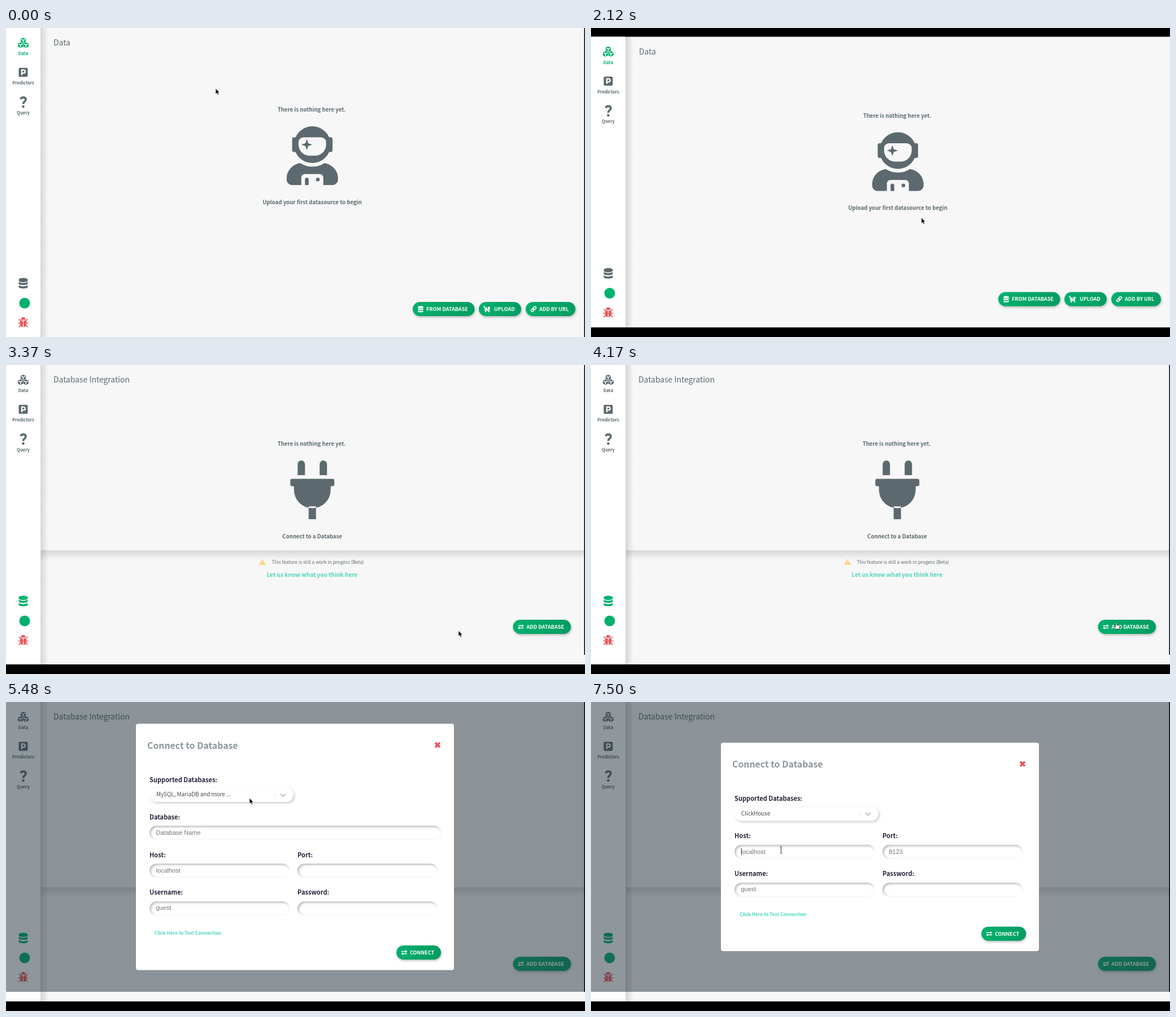
Recreate the animation shown at these times as an HTML page. Size 1025 by 547 pixels, loop 8 s.

```html
<!DOCTYPE html>
<html lang="en">
<head>
<meta charset="utf-8">
<title>Connect to a database</title>
<style>
html, body { margin: 0; width: 100%; height: 100%; overflow: hidden; background: #000 }
svg { display: block }
text { font-family: "Noto Sans CJK JP", "Noto Sans CJK SC", "Open Sans", sans-serif; fill: #5c696f; white-space: pre }
.b { font-weight: 700 }
.m { text-anchor: middle }
.in { font-family: "Liberation Sans", Arial, sans-serif; font-size: 10.95px; fill: #757575 }
.icon { fill: #5c696f; color: #5c696f }
.on, .on text { fill: #00b06d; color: #00b06d }
.btn text { fill: #fff }
.btn > rect { fill: url(#green); filter: drop-shadow(1px 2px 2px #0004) }
.line { fill: none; stroke: #fff; stroke-width: 1.5 }
.field, .select { box-sizing: border-box; height: 25px; margin: 3px; border-radius: 13px; background: #fff }
.field { box-shadow: inset 2px 2px 4px #b4b4b4, inset -2px -2px 4px #fff }
.select { box-shadow: 2px 2px 4px #ccc }
#menu { filter: drop-shadow(1px 2px 3px #0005) }
#menu text { fill: #9ba1a4 }
</style>
</head>
<body>
<svg id="stage" width="1025" height="547" viewBox="0 0 1025 547"></svg>
<script>
const text = (x, y, s, size, cls = "", extra = "") =>
  `<text x="${x}" y="${y}" font-size="${size}" class="${cls}" ${extra}>${s}</text>`;
const rect = (x, y, w, h, fill, rx = 0) =>
  `<rect x="${x}" y="${y}" width="${w}" height="${h}" rx="${rx}" fill="${fill}"/>`;
const group = (id, body, cls = "", at = "0 0") =>
  `<g id="${id}" class="${cls}" transform="translate(${at})">${body}</g>`;
const at = (x, y, body, k = 1) => `<g transform="translate(${x} ${y}) scale(${k})">${body}</g>`;
const box = (x, y, w, cls) =>
  `<foreignObject x="${x - 3}" y="${y - 3}" width="${w + 10}" height="34"><div class="${cls}" style="width:${w}px"></div></foreignObject>`;

// Icons, centred on 0,0
const cube = (x, y) => at(x, y,
  `<path d="M0-5l4.6 2v5.4L0 4.8l-4.6-2.4V-3z"/><path d="M-3.4-2L0-.5 3.4-2M0-.5V3.6" class="line" stroke-width="1.2"/>`);
const cubes = cube(0, -4.3) + cube(-4.8, 4) + cube(4.8, 4);
const disks = `<path d="M-8-6c0-4 16-4 16 0v1.500c0 4-16 4-16 0z"/>` +
  [-2, 4].map(y => `<path d="M-8 ${y}q8 4 16 0v3c0 3.500-16 3.500-16 0z"/>`).join("");
const parking = rect(-8, -8, 16, 16, "currentColor", 2) +
  `<path d="M-2.500 5V-4.200H.6a2.800 2.800 0 0 1 0 5.600H-2.500" class="line" style="stroke-width:2.2"/>`;
const question = `<path d="M-4.500-5C-3-9.500 4.500-9 4.500-4.500 4.500-.8 0-1 0 3.500" fill="none" stroke="currentColor" stroke-width="3.600"/><circle cy="8" r="2.300"/>`;
const bug = `<path d="M-4.500-4.600a4.500 4.500 0 0 1 9 0zM-5.500-3.300H-.7V8.500Q-5.500 8-5.500 3zM5.500-3.300H.7V8.500Q5.500 8 5.500 3z"/>
  <path d="M-8-6l3 3M8-6L5-3M-9 1.500H9M-8 8.500l3.500-4M8 8.500l-3.500-4" fill="none" stroke="#e8575c" stroke-width="1.700"/>`;
const cart = `<path d="M-6-4.500h2L-2.500 2.500H5" class="line"/><path d="M-2.500-3h3v3h1.500v-4H6L5 1.500h-7z" fill="#fff"/>
  <g fill="#fff"><circle cx="-2" cy="4.500" r="1.300"/><circle cx="4" cy="4.500" r="1.300"/></g>`;
const link = `<g class="line" transform="rotate(-45)"><rect x="-5.500" y="-2" width="6.500" height="4" rx="2"/><rect x="-1" y="-2" width="6.500" height="4" rx="2"/></g>`;
const swap = `<path d="M-5-2H3M5 2H-3" class="line"/><path d="M2-4.500L5.500-2 2 .5zM-2-.5L-5.500 2-2 4.500z" fill="#fff"/>`;

const astronaut = `<circle cx="224" cy="160" r="160"/>${rect(48, 96, 352, 128, "currentColor", 16)}
  <path fill="#f7f7f7" d="M104 136c0-22 21-40 48-40h144c27 0 48 18 48 40v24c0 53-43 96-96 96h-48c-53 0-96-43-96-96z"/>
  <path d="M176 112l12 36 36 12-36 12-12 36-12-36-36-12 36-12z"/>
  <path d="M120 321C53 328 0 385 0 454v10c0 26 21 48 48 48h80v-64c0-18 14-32 32-32h128c18 0 32 14 32 32v64h80c27 0 48-22 48-48v-10c0-69-53-126-120-133-30 20-66 31-104 31s-74-11-104-31z"/>
  <circle cx="272" cy="464" r="16"/><path d="M160 512v-48a16 16 0 0 1 32 0v48z"/>`;
const plug = `<path d="M64 128V32a32 32 0 0 1 64 0v96zM256 128V32a32 32 0 0 1 64 0v96zM32 220v36a160 160 0 0 0 320 0v-36zM160 400h64v112h-64z"/>
  ${rect(0, 160, 384, 64, "currentColor", 16)}`;

const button = (x, y, w, icon, label, id = "") =>
  group(id, rect(0, 0, w, 25, "", 12.5) + at(14, 12.5, icon) + text(24, 15.900, label, 9.05, "b"), "btn", `${x} ${y}`);
const nav = (id, y, icon, label) =>
  group(id, at(30.5, y, icon) + text(30.5, y + 21.700, label, 7.6, "b m"), "icon");
const label = (x, y, s) => text(x, y + 4, s, 11.05, "b", 'style="fill:#25243c"');
const field = (x, y, w, s, id = "") => box(x, y - 12, w, "field") + text(x + 11.5, y + 3.900, s, 10.95, "in", `id="${id}"`);
const pick = (id, s) => text(266, 167.400, s, 9.85, "", `id="${id}" style="fill:#45484f"`);
const empty = text(541, 148, "There is nothing here yet.", 9.67, "b m");

const engines = ["ClickHouse", "MariaDB", "MongoDB", "Quillmont SQL Server", "MySQL", "PostgreSQL", "Brindlark"];

const sidebar = rect(0, 0, 61, 547, "#fff") + rect(61, 0, 14, 547, "url(#side)") +
  nav("navData", 26.5, cubes, "Data") + nav("navPred", 78.5, parking, "Predictors") + nav("navQuery", 131, question, "Query");
const tools = group("tools", group("navDb", at(30.5, -95.5, disks), "icon") +
  `<circle cx="33" cy="-60" r="9.500" fill="#00b06d"/><g fill="#e8575c">${at(30.5, -26, bug)}</g>`);

const dataPage = group("dataPage", text(84, 31, "Data", 13.9) +
  group("dataMid", empty + `<g class="icon">${at(496.8, 174, astronaut, .203)}</g>` +
    text(542, 311.600, "Upload your first datasource to begin", 9.67, "b m")) +
  group("dataBtns", button(720, -62, 109.5, `<g fill="#fff">${at(0, 0, disks, .6)}</g>`, "FROM DATABASE", "fromDb") +
    button(837, -62, 75, cart, "UPLOAD").replace('x="24"', 'x="27"') + button(920, -62, 88, link, "ADD BY URL")));

const dbPage = group("dbPage", text(84, 31, "Database Integration", 13.9) + rect(62, 328, 970, 17, "url(#fall)") +
  group("", empty + `<g class="icon">${at(503.3, 174, plug, .203)}</g>` +
    text(542, 311.600, "Connect to a Database", 9.67, "b m"), "", "0 -5") +
  `<path d="M454 344.500l4.800 8.500h-9.600z" fill="#fad27c" stroke="#fad27c" stroke-width="1.500" stroke-linejoin="round"/>
   <path d="M454 346.500v3.200m0 1.200v1.200" stroke="#fff"/>` +
  text(470.5, 352, "This feature is still a work in progess (Beta)", 8.3) +
  text(542, 375.400, "Let us know what you think here", 10.1, "b m", 'style="fill:#4dd4c0"') +
  button(897.5, 451, 102.5, swap, "ADD DATABASE"));

const menu = group("menu", `<path fill="#fff" d="M254 178.500h254.500V361q0 10-10 10H264q-10 0-10-10z"/>` +
  rect(254, 179, 254, 26, "#b1d3fe") +
  engines.map((s, i) => text(263, 195.600 + 26.1 * i, s, 9.85)).join(""));

const modal = group("modal", rect(0, 0, 1024, 513, "rgba(32,48,58,.5)") + `<rect id="card" x="230" width="563" rx="4" fill="#fff"/>` +
  group("head", text(250, 82.900, "Connect to Database", 15.85, "b", 'style="fill:#8b969a"') +
    `<path d="M760 72l8 8m0-8l-8 8" stroke="#e8575c" stroke-width="3.800"/>` + label(254, 137.5, "Supported Databases:") +
    box(254, 151.5, 255, "select") + pick("pickNone", "MySQL, MariaDB and more ...") + pick("pickOne", "ClickHouse") +
    rect(475.5, 164, 1, 2, "#bbb") + `<path id="chevron" d="M486 162.500l4.200 4.500 4.200-4.500" fill="none" stroke-width="1.800"/>`) +
  group("dbName", label(254, 204, "Database:") + field(254, 231, 516, "Database Name")) +
  group("form", label(254, 270.5, "Host:") + field(254, 298, 248, "localhost") +
    label(516, 270.5, "Port:") + field(516, 298, 248, "8123", "port") +
    label(254, 337, "Username:") + field(254, 364.5, 248, "guest") +
    label(516, 337, "Password:") + field(516, 364.5, 248, "") +
    text(263, 412.300, "Click Here to Test Connection", 8.25, "b", 'style="fill:#4dd4c0"') +
    button(691, 431, 79, swap, "CONNECT") + group("caret", rect(265.8, 292, 1, 12, "#222"))) + menu);

const cursors = group("cursor",
  group("arrow", `<path d="M0 0v10l2.300-2 1.700 3.600 1.700-.8L4.200 7.400H7.200z" fill="#000" stroke="#fff" stroke-width=".7"/>`) +
  group("hand", `<path d="M-1 1.200a1 1 0 0 1 2 0v4l4 .8q1.500.4 1.300 2l-.8 3-1 1.500h-5L-4 8.300q-.3-1.400 1-1l2 1z" fill="#fff" stroke="#333" stroke-width=".9"/>`) +
  group("beam", `<path d="M-2-6q2 0 2 1.500v9Q0 6-2 6M2-6Q0-6 0-4.500M2 6Q0 6 0 4.500" fill="none" stroke="#333"/>`));

const stage = document.getElementById("stage");
stage.innerHTML = `<defs>
  <linearGradient id="green"><stop stop-color="#00b06d"/><stop offset="1" stop-color="#059c62"/></linearGradient>
  <linearGradient id="side"><stop stop-opacity=".14"/><stop offset="1" stop-opacity="0"/></linearGradient>
  <linearGradient id="fall" x2="0" y2="1"><stop stop-opacity=".13"/><stop offset="1" stop-opacity="0"/></linearGradient>
  </defs>` + group("page", rect(0, 0, 1025, 547, "#f7f7f7") + group("main", dataPage + dbPage) + sidebar + tools +
  modal + `<rect id="edge" x="1023.500" width="1.500"/>`) + `<rect id="foot" y="530" width="1025" height="17"/>` + cursors;

const $ = Object.fromEntries([...stage.querySelectorAll("[id]")].map(e => [e.id, e]));
const show = (id, on) => $[id].style.display = on ? "" : "none";
const move = (id, x, y) => $[id].setAttribute("transform", `translate(${x} ${y})`);

// Pointer moves: start, end, steps, x, y, shape on arrival
const moves = [
  [120, 120, 1, 371, 121, "arrow"], [430, 910, 6, 21.5, 50.5, "hand"], [1680, 1960, 4, 492, 265, "arrow"],
  [2120, 2260, 3, 770.5, 477.5, "hand"], [3370, 3520, 3, 862, 456, "arrow"], [3660, 3840, 3, 930, 455, "hand"],
  [4730, 4790, 2, 582, 312, "arrow"], [4930, 5170, 4, 432, 176, "arrow"], [5400, 5480, 2, 431, 170, "arrow"],
  [5980, 6240, 4, 306, 188.5, "arrow"], [7020, 7210, 3, 330, 282, "beam"], [7300, 7400, 2, 336.5, 262, "beam"]];

function pointer(t) {
  let x = 371, y = 107, kind = "arrow";
  for (const [a, b, n, px, py, shape] of moves) {
    if (t < a) break;
    const p = t >= b ? 1 : (Math.floor((t - a) / (b - a) * (n - 1)) + 1) / n;
    x += (px - x) * p;
    y += (py - y) * p;
    kind = p === 1 ? shape : "arrow";
  }
  return [x, y, kind];
}

function draw(t) {
  const full = t < 120, barred = !full && t < 3370, onDb = t >= 2830, chosen = t >= 6740;
  const height = full ? 547 : barred ? 514 : 513;
  move("page", 0, barred ? 15.5 : 0);
  move("main", barred ? 1 : 0, 0);
  move("tools", 0, height);
  move("dataMid", 0, full ? 0 : -5);
  move("dataBtns", 0, height);
  show("dataPage", !onDb);
  show("dbPage", onDb);
  $.navData.classList.toggle("on", !onDb);
  $.navDb.classList.toggle("on", onDb);
  $.fromDb.style.filter = t >= 2260 && t < 2640 ? "drop-shadow(1px 2px 2px #0003)" : "";
  show("foot", !full);
  show("edge", !barred);
  $.edge.setAttribute("height", height);

  show("modal", t >= 4300);
  $.card.setAttribute("y", chosen ? 72 : 38.5);
  $.card.setAttribute("height", chosen ? 369 : 436);
  move("head", 0, chosen ? 33.5 : 0);
  move("form", 0, chosen ? -33.3 : 0);
  show("dbName", !chosen);
  show("port", chosen);
  show("pickNone", !chosen);
  show("pickOne", chosen);
  show("menu", t >= 5700 && !chosen);
  $.menu.style.opacity = Math.min(1, .4 + .3 * Math.floor((t - 5700) / 65));
  $.chevron.setAttribute("stroke", t >= 5700 && t < 7020 ? "#555" : "#b5b5b5");
  show("caret", t >= 7500);

  const [x, y, kind] = pointer(t);
  move("cursor", x, y);
  for (const k of ["arrow", "hand", "beam"]) show(k, k === kind);
}

const start = performance.now();
(function tick() {
  draw((performance.now() - start) % 8000);
  requestAnimationFrame(tick);
})();
</script>
</body>
</html>
```
